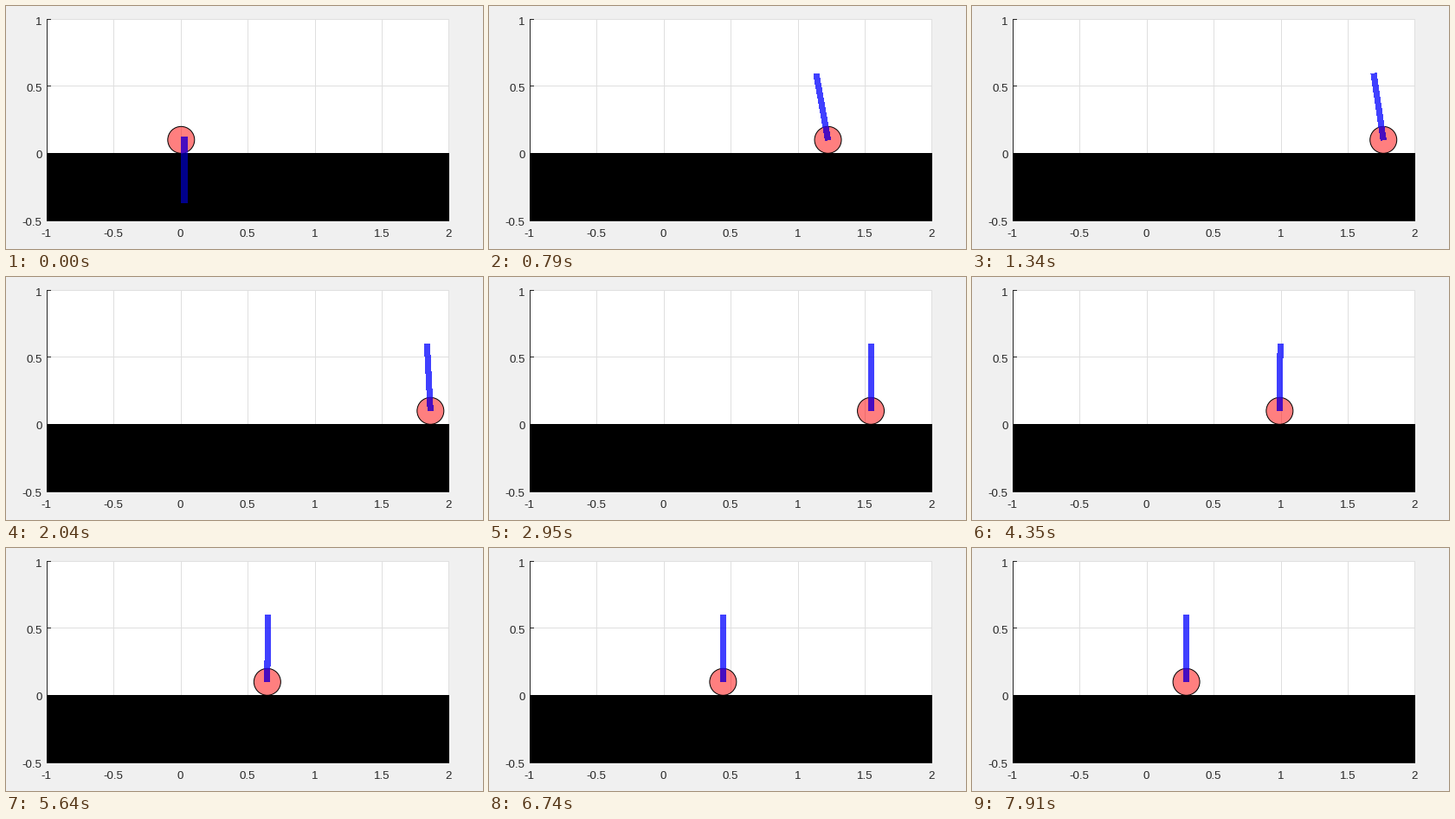
A matplotlib script for the animation above (7990 ms loop, 551 px wide and 281 px high).

```python
import math

import numpy as np
import matplotlib.pyplot as plt
from matplotlib.animation import FuncAnimation
from matplotlib.patches import Circle, Rectangle

W, H, DPI = 551, 281, 100
LOOP_MS, FRAMES = 7990, 103
STEP = LOOP_MS / FRAMES
LAG = 0.018                        # seconds between frame start and pose
PT = 72 / DPI                      # points per pixel
LEFT, TOP, UNIT = 47.5, 15.5, 154.8
RADIUS, LENGTH = 0.1, 0.5
INK, GRID = "#262626", "#dfdfdf"


def px(x):
    return LEFT + (x + 1) * UNIT


def py(y):
    return TOP + (1 - y) * UNIT


def cart(t):
    """Position: a fast swing to the right, then a slow decay to zero."""
    swing = math.cos(t / 2) + 2.5 * math.sin(t / 2)
    return 4.57 * (math.exp(-0.35 * t) - math.exp(-1.7 * t) * swing)


def tilt(t):
    """Lean of the pole to the right, in radians."""
    return (0.055 * math.exp(-0.35 * t) + (1.3 - 2.92 * t) * math.exp(-2 * t)
            - 0.7 * math.exp(-5.5 * t))


fig = plt.figure(figsize=(W / 100, H / 100), dpi=DPI, facecolor="#f0f0f0")
ax = fig.add_axes([0, 0, 1, 1])
ax.set_xlim(0, W)
ax.set_ylim(H, 0)
ax.axis("off")


def box(x, y, w, h, color):
    ax.add_patch(Rectangle((x, y), w, h, fc=color, lw=0))


def label(x, y, value, align):
    ax.text(x, y, f"{value:g}", ha=align, va="baseline", color=INK,
            family="Liberation Sans", fontsize=13.3 * PT)


def make_pole(color):
    return ax.plot([], [], color=color, lw=6.05 * PT, antialiased=False,
                   solid_capstyle="butt", zorder=5)[0]


box(47, 15, 465, 233, "white")
for value in np.arange(-1, 2.1, 0.5):
    box(math.floor(px(value)), 15, 1, 233, GRID)
    label(px(value) - 0.7, 267, value, "center")
for value in np.arange(-0.5, 1.1, 0.5):
    row = math.floor(py(value))
    box(47, row, 465, 1, GRID)
    box(47, row, 5, 1, INK)
    label(41.6, py(value) + 6, value, "right")
box(47, 15, 1, 233, INK)
box(47, 248, 465, 1, INK)
box(47, 170, 465, 78, "black")

ball = Circle((px(0), py(RADIUS)), RADIUS * UNIT, fc=(1, 0, 0, 0.5),
              ec="black", lw=PT, zorder=4)
ax.add_patch(ball)
pole = make_pole("blue")
inner = make_pole("#480cc0")       # part of the pole inside the ball


def draw(k):
    if k == 0:
        # resting picture before the run starts
        x, xs, ys = 0, [0.027, 0.027], [0.125, -0.372]
    else:
        t = k * STEP / 1000 + LAG
        x, lean = cart(t), tilt(t)
        xs = [x, x + LENGTH * math.sin(lean)]
        ys = [RADIUS, RADIUS + LENGTH * math.cos(lean)]
    ball.center = (px(x), py(RADIUS))
    for line in (pole, inner):
        line.set_data([px(v) for v in xs], [py(v) for v in ys])
    pole.set_alpha(0.75 if k else 0.55)
    inner.set_clip_path(ball)
    return ball, pole, inner


anim = FuncAnimation(fig, draw, frames=FRAMES, interval=STEP, repeat=True,
                     repeat_delay=0, blit=False)
plt.show()
```
